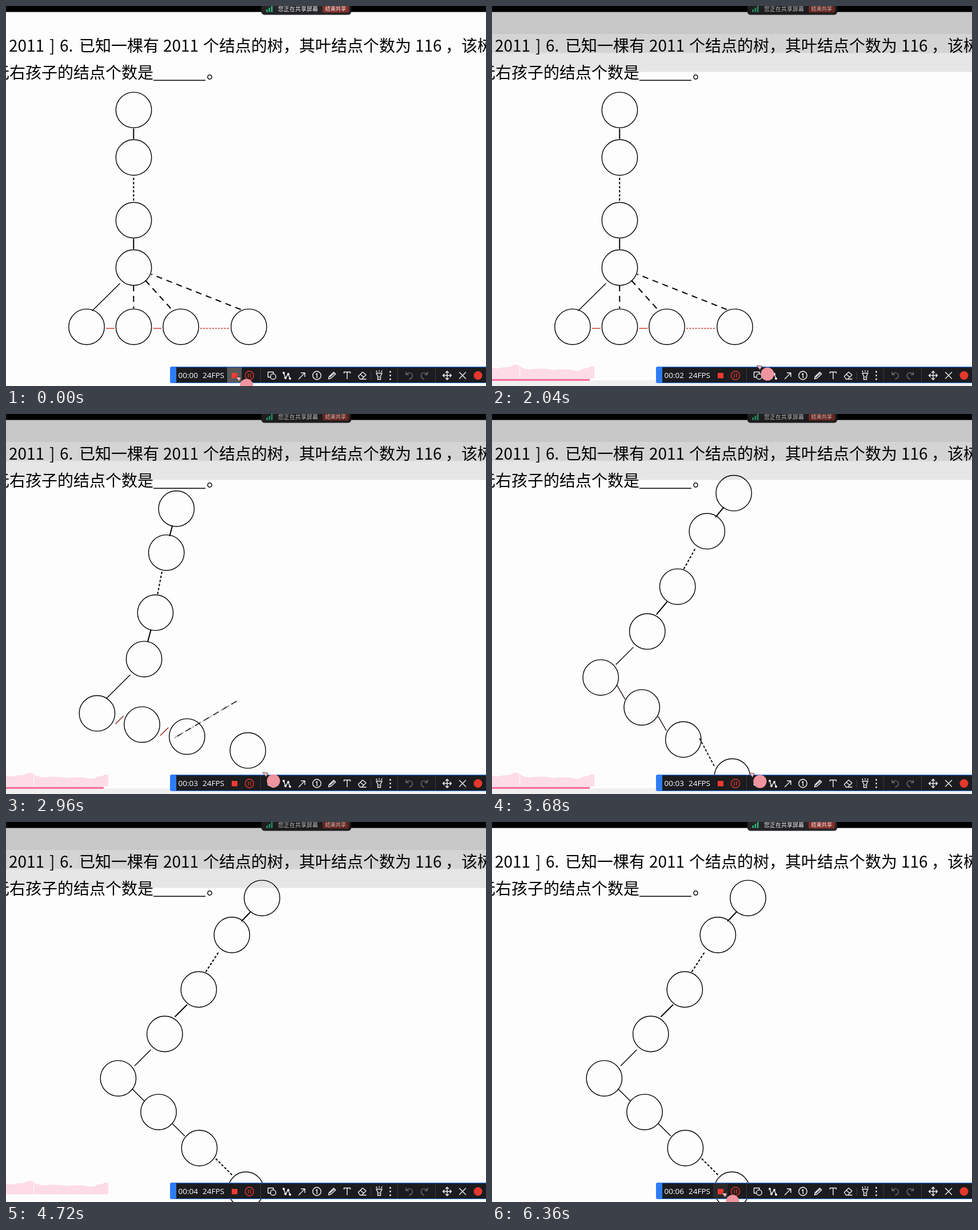
An HTML page for the animation above (6.44 s loop, 840 px wide and 666 px high).

```html
<!DOCTYPE html>
<html lang="zh-CN">
<head>
<meta charset="utf-8">
<style>
html, body { margin: 0; width: 100%; height: 100%; overflow: hidden; background: #fdfdfd; }
svg { display: block; }
.cjk { font-family: "Noto Sans CJK SC", "Noto Sans CJK", sans-serif; }
.question { font-size: 28px; font-weight: 300; fill: #000; }
.status { font: 13.5px "Open Sans", "Noto Sans", sans-serif; fill: #fff; }
.icon { fill: none; stroke: #f2f2f2; stroke-width: 1.4; stroke-linecap: round; stroke-linejoin: round; }
</style>
</head>
<body>
<svg id="stage" width="840" height="666" viewBox="0 0 840 666">
  <g id="question" class="cjk question"></g>
  <path d="M258 130.3H349" stroke="#000" stroke-width="1.6"/>
  <g id="tree" fill="none" stroke="#000"></g>

  <rect width="840" height="10.5"/>
  <g class="cjk" fill="#f4f4f4">
    <rect x="447" y="-8" width="157" height="23.5" rx="5" fill="#252528"/>
    <path d="M455.5 6h2.6v4.500h-2.600zM459.700 3h2.600v7.500h-2.600zM463.900 -1h2.600v11.500h-2.600z" fill="#2fb57c"/>
    <text x="476" y="8.500" font-size="10">您正在共享屏幕</text>
    <rect x="554" y="-4" width="46" height="15.500" rx="3" fill="#85302b"/>
    <text x="558.500" y="8" font-size="9.200">结束共享</text>
  </g>

  <g id="controls">
    <rect width="840" height="49" opacity=".217"/>
    <rect y="49" width="840" height="33.500" opacity=".162"/>
    <rect y="82.500" width="840" height="33" opacity=".092"/>
    <path d="M0 634Q10 637 20 633Q30 634 36 630Q43 627 49 631Q54 636 66 637Q90 634 108 638Q130 635 146 639Q156 640 160 635Q168 636 172 632L179 632V652.500H0Z" fill="#fddce7"/>
    <path d="M48.800 631V652.500" stroke="#fff"/>
    <g id="progress">
      <rect y="656" width="840" height="10" fill="#f0f0f0"/>
      <rect y="653.500" width="171" height="3.500" fill="#f8709c"/>
    </g>
  </g>

  <g id="toolbar">
    <rect x="287" y="632" width="556" height="29" rx="3" fill="#2e7df6"/>
    <rect x="298" y="633.200" width="545" height="26.800" fill="#1b1c1f"/>
    <rect id="hover" x="387" y="633.200" width="25.500" height="26.800" fill="#57585a"/>
    <text id="clock" class="status" x="301.500" y="652"></text>
    <text class="status" x="344" y="652">24FPS</text>
    <rect x="395" y="643" width="10" height="9.500" fill="#f03a2e"/>
    <g class="icon" style="stroke:#e83a2e"><circle cx="426" cy="647.500" r="7.500"/><path d="M424 644.500v6M428 644.500v6"/></g>
    <path d="M445.500 633.500v26M685.500 633.500v26M751.500 633.500v26" stroke="#3b3c3f"/>
    <path d="M638.500 641v14" stroke="#3b3c3f"/>
    <g class="icon">
      <path d="M462 650.500H458.500V641.500H468V644"/><circle cx="467.500" cy="649.500" r="4.700"/>
      <path d="M486 643L489 652L494 645L497 653"/>
      <path d="M512.500 653.500L523 643M516.500 643H523V649.500"/>
      <circle cx="544" cy="647.500" r="7.200"/><path d="M542.500 645.500L544.300 644V651.500"/>
      <path d="M564.500 653.500L565.500 649.500L573.500 641.800L576.800 645L568.500 652.500ZM567 650L574.500 643.500"/>
      <path d="M591.500 643.500V641.500H602.500V643.500M597 641.500V653.500"/>
      <path d="M616.500 649L624 641.500L630 646.500L622.500 654H619.500ZM620 645.500L626 650.500M624 654H630"/>
      <path d="M648 643.500H658L655.500 648.500V654.500H650.500V648.500ZM653 649.500v1.500M649 641L648 639.500M653 640.500V639M657 641L658 639.500"/>
      <path d="M764.500 647.500H779.500M772 640V655M767 645L764.500 647.500L767 650M777 645L779.500 647.500L777 650M769.500 642.500L772 640L774.500 642.500M769.500 652.500L772 655L774.500 652.500"/>
      <path d="M793.500 642L804.500 653M804.500 642L793.500 653"/>
    </g>
    <g fill="#f2f2f2">
      <circle cx="486" cy="643" r="2"/><circle cx="489" cy="652" r="2"/><circle cx="494" cy="645" r="2"/><circle cx="497" cy="653" r="2"/>
      <circle cx="672.500" cy="641" r="1.500"/><circle cx="672.500" cy="647.500" r="1.500"/><circle cx="672.500" cy="654" r="1.500"/>
    </g>
    <g class="icon" style="stroke:#6d6e70">
      <path d="M700 641.500V646H704.500M700.500 645.500Q706 640 710.500 645Q713 651 706 654"/>
      <path d="M737.500 641.500V646H733M737 645.500Q731.500 640 727 645Q724.500 651 731.500 654"/>
    </g>
    <circle cx="826" cy="647.500" r="7.500" fill="#e5382c"/>
  </g>

  <g id="cursor">
    <circle cx="19" cy="15" r="11.500" fill="#f0949f"/>
    <path d="M0 0L9.500 1L6 8Z" fill="#f8bcc4" stroke="#33262a" stroke-width=".7"/>
  </g>
</svg>
<script>
const LOOP = 6440;
const byId = id => document.getElementById(id);
const lerp = (a, b, p) => a + (b - a) * p;
const clamp = v => Math.min(1, Math.max(0, v));
const ramp = (t, start, end) => clamp((t - start) / (end - start));

function add(parent, tag, attrs, text = "") {
  const el = document.createElementNS("http://www.w3.org/2000/svg", tag);
  for (const key in attrs) el.setAttribute(key, attrs[key]);
  el.textContent = text;
  return parent.appendChild(el);
}

const phrases = [
  [5, 80, "2011"], [76, 80, "]"], [94, 80, "6."], [128, 80, "已知一棵有"], [275, 80, "2011"],
  [345, 80, "个结点的树，其叶结点个数为"], [716, 80, "116"], [769, 80, "，"], [797, 80, "该树"],
  [-22, 127, "无右孩子的结点个数是"], [351, 127, "。"]
];
for (const [x, y, text] of phrases) add(byId("question"), "text", { x, y }, text);

const tree = byId("tree");

// Each node travels from its first point to its second.
const nodes = [
  [223.5, 182.3, 448, 133.3], [223.5, 265.5, 395.3, 198], [223.5, 375.5, 337.3, 293.5], [223.5, 458.5, 277.8, 371.5],
  [141, 562.3, 196.4, 449.3], [223.5, 562.3, 267, 508.3], [306, 562.3, 338.4, 571.5], [425, 562.3, 419.8, 644.5]
].map(move => ({ move, el: add(tree, "circle", { r: 31.2, "stroke-width": 1.4 }) }));

function segment([x1, y1, x2, y2]) {
  const angle = Math.atan2(y2 - y1, x2 - x1) * 180 / Math.PI;
  return { x: (x1 + x2) / 2, y: (y1 + y2) / 2, length: Math.hypot(x2 - x1, y2 - y1), angle: (angle + 360) % 360 };
}

function edge(from, to, width, style = {}) {
  const { dash = "none", red = false, fade = () => 1 } = style;
  const el = add(tree, "line", { "stroke-width": width, "stroke-dasharray": dash });
  return { from: segment(from), to: segment(to), el, red, fade };
}

const leave = { fade: p => 1 - clamp(p / 0.25) };
const longDash = "10.5 8", shortDash = "4.2 3";
const outer = [411, 532, 254, 470], outerEnd = [367, 590, 397, 620];
const still = (points, width, style) => edge(points, points, width, { ...leave, ...style });
const edges = [
  edge([223.3, 215, 223.3, 233], [428.500, 157, 412, 174], 2),
  edge([223.3, 301, 223.3, 344], [371.500, 229, 349, 263.500], 2, { dash: shortDash }),
  edge([223.3, 408, 223.3, 426], [317, 320, 295.500, 341.500], 2),
  edge([199.500, 486, 150.500, 534.500], [253.500, 399, 225, 427.500], 1.4),
  edge([190, 565, 175, 565], [220.500, 467.500, 242, 489], 1.4, { red: true }),
  edge([272, 565, 257.500, 565], [291, 528.500, 313, 550.500], 1.4, { red: true }),
  still([223.3, 489.500, 223.3, 530], 2, { dash: longDash }),
  still([244, 481, 291, 533], 2, { dash: longDash }),
  still([340, 565, 391, 565], 1.4, { dash: "3 2.2", red: true }),
  edge(outer, outerEnd, 2, { dash: longDash, fade: p => 1 - p }),
  edge(outer, outerEnd, 2, { dash: shortDash, fade: p => p })
];

// Slow start and long settle: cubic Bezier (0.4, 0, 0.2, 1).
function settle(t) {
  let lo = 0, hi = 1;
  for (let i = 0; i < 24; i++) {
    const s = (lo + hi) / 2, r = 1 - s;
    if (1.2 * r * r * s + 0.6 * r * s * s + s ** 3 < t) lo = s; else hi = s;
  }
  return lo * lo * (3 - 2 * lo);
}

function drawTree(p) {
  for (const { move: [x1, y1, x2, y2], el } of nodes) {
    el.setAttribute("cx", lerp(x1, x2, p));
    el.setAttribute("cy", lerp(y1, y2, p));
  }
  for (const { from, to, el, red, fade } of edges) {
    const mix = key => lerp(from[key], to[key], p);
    const half = mix("length") / 2;
    el.setAttribute("x1", -half);
    el.setAttribute("x2", half);
    el.setAttribute("transform", `translate(${mix("x")} ${mix("y")}) rotate(${mix("angle")})`);
    el.setAttribute("opacity", fade(p));
    if (red) el.setAttribute("stroke", `rgb(${lerp(200, 0, p)},${lerp(50, 0, p)},${lerp(35, 0, p)})`);
  }
}

// Pointer stops: time, x, y.
const pointer = [
  [0, 402, 650], [480, 402, 650], [840, 446, 645], [960, 446, 645], [1120, 460, 638], [1360, 486, 635],
  [1560, 470, 634], [1760, 465, 631], [2040, 463, 630], [2440, 463, 630], [2920, 449, 628], [3600, 450, 629],
  [4719, 450, 629], [4720, 620, 690], [5040, 620, 672], [5080, 608, 660], [5280, 533, 661], [5320, 525, 668],
  [5440, 505, 645], [5640, 470, 618], [5840, 430, 622], [6080, 404, 648], [6160, 402, 650], [LOOP, 402, 650]
];

function pointerAt(t) {
  const i = pointer.findIndex(stop => stop[0] > t);
  const [t1, x1, y1] = pointer[i - 1], [t2, x2, y2] = pointer[i];
  const p = ramp(t, t1, t2);
  return `translate(${lerp(x1, x2, p)} ${lerp(y1, y2, p)})`;
}

function draw(t) {
  drawTree(settle(ramp(t, 2335, 4514)));
  const firstShow = ramp(t, 1740, 1960) - ramp(t, 4730, 4940);
  const secondShow = ramp(t, 5420, 5640) - ramp(t, 5880, 6080);
  byId("controls").setAttribute("opacity", firstShow + secondShow);
  byId("progress").setAttribute("opacity", t >= 4720 && t < 5420 ? 0 : 1);
  byId("hover").setAttribute("opacity", t < 520 ? 1 : t >= 6360 ? 0.25 : 0);
  const seconds = [960, 1960, 2920, 3920, 4880, 5880].filter(mark => t >= mark).length;
  byId("clock").textContent = "00:0" + seconds;
  byId("cursor").setAttribute("transform", pointerAt(t));
}

const begin = performance.now();
function frame() {
  draw((performance.now() - begin) % LOOP);
  requestAnimationFrame(frame);
}
draw(0);
requestAnimationFrame(frame);
</script>
</body>
</html>
```
